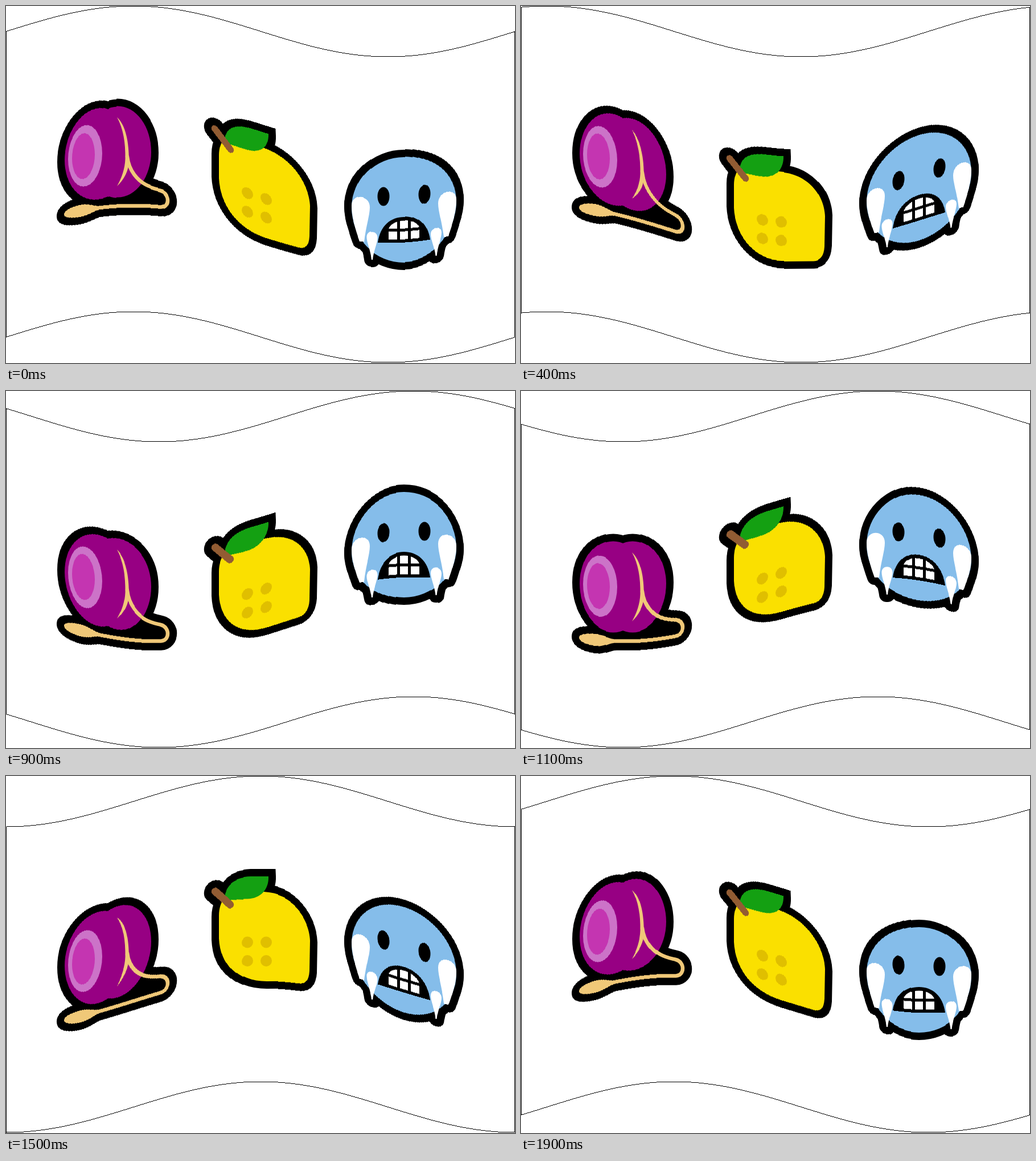
Write an HTML page with a canvas that moves like this. It is 894 px wide and 626 px high and loops after 2 s.

```html
<!DOCTYPE html>
<html lang="en">
<head>
<meta charset="utf-8">
<title>Waving flag</title>
<style>
  html, body { margin: 0; width: 100%; height: 100%; overflow: hidden; background: #fff; }
  canvas { display: block; }
</style>
</head>
<body>
<canvas id="stage" width="894" height="626"></canvas>
<script>
const WIDTH = 894, HEIGHT = 626, FLAG_HEIGHT = 537;
const LOOP = 2000, STEP = 100, AMPLITUDE = (HEIGHT - FLAG_HEIGHT) / 2, OUTLINE = 13;

const flag = document.createElement('canvas');
flag.width = WIDTH;
flag.height = FLAG_HEIGHT;
const art = flag.getContext('2d');
const view = document.getElementById('stage').getContext('2d');

const oval = (x, y, rx, ry = rx) => {
  const path = new Path2D();
  path.ellipse(x, y, rx, ry, 0, 0, Math.PI * 2);
  return path;
};

const fill = (shape, color) => ({ path: shape instanceof Path2D ? shape : new Path2D(shape), color, line: 0 });
const line = (d, color, width) => ({ path: new Path2D(d), color, line: width });

function paint({ path, color, line }) {
  art.fillStyle = art.strokeStyle = color;
  if (line) {
    art.lineWidth = line;
    art.stroke(path);
  } else {
    art.fill(path);
  }
}

// Body parts get a shared black outline; details lie inside it.
function drawSticker(body, details) {
  art.lineCap = 'round';
  art.strokeStyle = art.fillStyle = '#000';
  for (const part of body) {
    art.lineJoin = part.sharp ? 'miter' : 'round';
    art.lineWidth = part.line + OUTLINE * 2;
    art.stroke(part.path);
    if (!part.line) art.fill(part.path);
  }
  art.lineJoin = 'round';
  body.forEach(paint);
  art.lineCap = 'butt';
  details.forEach(paint);
}

function drawYoyo() {
  const plum = '#970083', tan = '#f0c878';
  drawSticker([
    fill('M225 330H270V343H225Z', '#000'),
    fill(oval(162, 255.5, 59, 80), plum),
    fill(oval(196, 255.5, 59, 80), plum),
    line('M213 264C216 290 232 306 245 313C256 319 264 320 272 322C288 326 288 350 272 350.5L155 350.5', tan, 6.5),
    fill('M102 350.5C102 344 116 340 131 340C146 340 153 346 163 347V354C153 355 146 361 131 361C116 361 102 357 102 350.5Z', tan),
  ], [
    fill('M195 195C211 210 216 240 216 272C216 288 207 305 195 316C203 302 209 285 209.5 268C210 240 206 215 195 195Z', tan),
    fill(oval(139, 255.5, 30, 53.5), '#cc73c8'),
    fill(oval(136, 255.5, 20, 40), '#c435b1'),
  ]);
}

function drawLemon() {
  const leaf = fill('M383 215C385 190 398 177 430 176L461 176C462 199 447 215 424 215.5C410 216 396 215 383 215Z', '#14a012');
  leaf.sharp = true;
  const dots = [424, 457].flatMap(x => [291.5, 324].map(y => fill(oval(x, y, 10), '#e0bf00')));
  drawSticker([
    fill('M374 240V280C376 325 405 360 458 360L514 359.5C526 359 532 351 533 335L534 282C532 240 500 203 448 203C430 203 400 205 380 214C376 222 374 230 374 240Z', '#fae000'),
    leaf,
    line('M367 195.5L394 223.5', '#925c33', 12.5),
  ], dots);
}

function drawFace() {
  const bigTear = (x, dir) => {
    const at = dx => x + dx * dir;
    return fill(
      `M${at(-16)} 266C${at(-16)} 243 ${at(16)} 243 ${at(16)} 266` +
      `C${at(16)} 280 ${at(9)} 300 ${at(6)} 327H${at(-2)}` +
      `C${at(-9)} 308 ${at(-16)} 285 ${at(-16)} 266Z`, '#fff');
  };
  const smallTear = x => fill(
    `M${x - 9.5} 318C${x - 9.5} 305 ${x + 9.5} 305 ${x + 9.5} 318` +
    `C${x + 9.5} 328 ${x + 3} 340 ${x + 1} 357H${x - 1}C${x - 3} 340 ${x - 9.5} 328 ${x - 9.5} 318Z`, '#fff');
  drawSticker([
    fill(oval(699, 269.5, 92, 92.5), '#85bdea'),
    bigTear(623, 1),
    bigTear(775, -1),
    smallTear(643),
    smallTear(755.5),
  ], [
    fill(oval(663, 246, 10.5, 16.5), '#000'),
    fill(oval(735, 246, 10.5, 16.5), '#000'),
    fill('M653 327C657 297 676 282 699 282S741 297 745 327Z', '#000'),
    fill('M672 321.5V303C674 296 684 288.5 699 288.5S724 296 726 303V321.5Z', '#fff'),
    line('M689.5 285V323M708.5 285V323M670 305H728', '#000', 5),
  ]);
}

function drawFlag() {
  art.fillStyle = '#fff';
  art.fillRect(0, 0, WIDTH, FLAG_HEIGHT);
  drawYoyo();
  drawLemon();
  drawFace();
  art.lineWidth = 1;
  art.lineJoin = 'miter';
  art.strokeStyle = '#000';
  art.strokeRect(0.5, 0.5, WIDTH - 1, FLAG_HEIGHT - 1);
}

function wave(time) {
  view.fillStyle = '#fff';
  view.fillRect(0, 0, WIDTH, HEIGHT);
  for (let x = 0; x < WIDTH; x++) {
    const angle = 2 * Math.PI * (x / WIDTH + time / LOOP);
    const y = Math.floor(AMPLITUDE * (1 - Math.sin(angle)));
    view.drawImage(flag, x, 0, 1, FLAG_HEIGHT, x, y, 1, FLAG_HEIGHT);
  }
}

let shown = -1;
function tick() {
  const step = Math.floor(performance.now() % LOOP / STEP);
  if (step !== shown) {
    shown = step;
    wave(step * STEP);
  }
  requestAnimationFrame(tick);
}

drawFlag();
tick();
</script>
</body>
</html>
```
